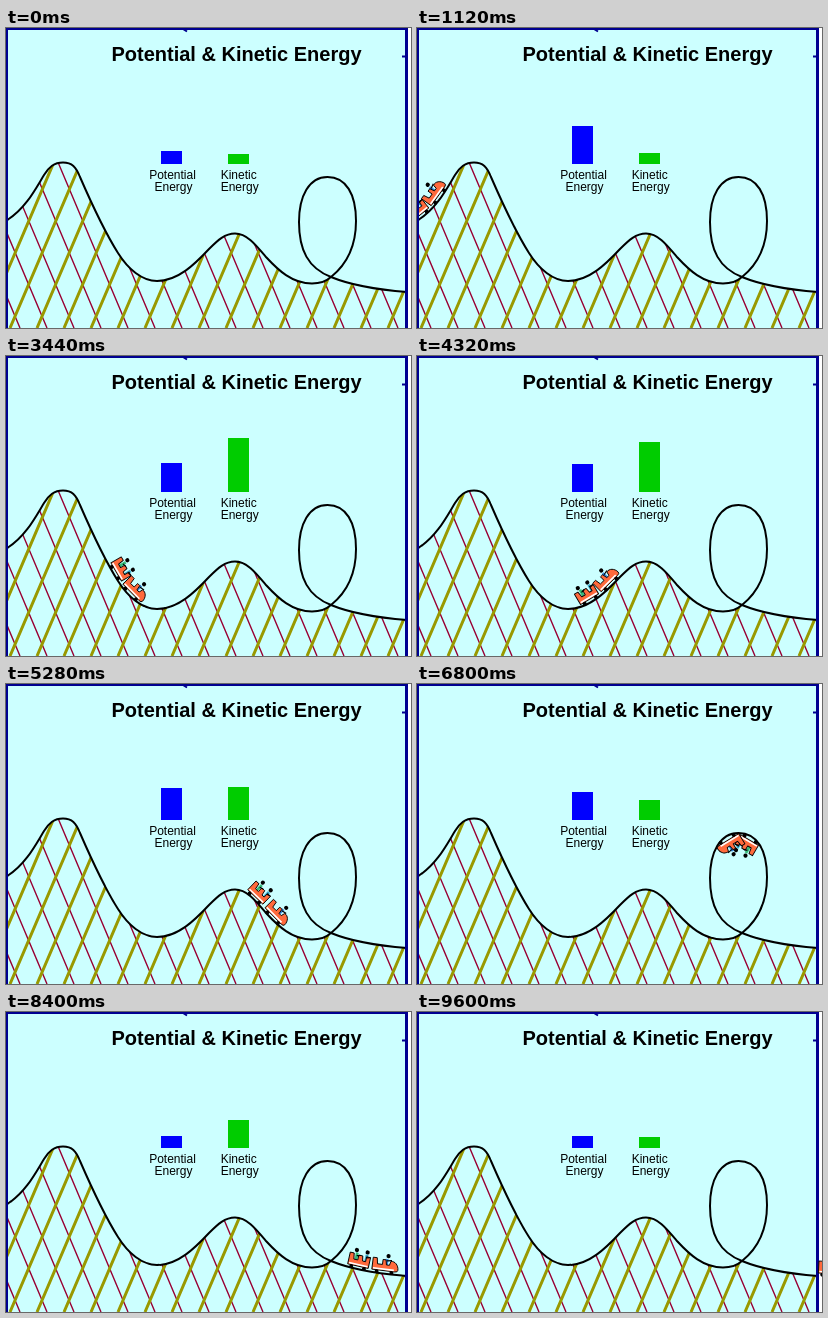
Recreate the animation shown at these times as an HTML page. Size 405 by 300 pixels, loop 9680 ms.

```html
<!DOCTYPE html>
<html lang="en">
<head>
<meta charset="utf-8">
<title>Potential &amp; Kinetic Energy</title>
<style>
  html, body { margin: 0; width: 100%; height: 100%; overflow: hidden; background: #fff; }
  svg { display: block; width: 405px; height: 300px; }
  text { font-family: "Liberation Sans", Arial, sans-serif; font-size: 12px; text-anchor: middle; }
  .title { font-size: 20px; font-weight: bold; }
  .body { fill: #ff6a3c; stroke: #000; stroke-width: .9; stroke-linejoin: round; }
  .rider { fill: none; stroke-width: 2.8; }
  .arm { fill: none; stroke: #000; stroke-width: 1.2; }
  .trim { fill: none; stroke: #fff; stroke-width: 1.6; }
</style>
</head>
<body>
<svg viewBox="0 0 405 300">
  <defs>
    <clipPath id="ground"><path id="groundShape"/></clipPath>
    <clipPath id="stage"><rect x="2" y="2" width="403" height="298"/></clipPath>
  </defs>
  <rect width="402" height="300" fill="#ccffff"/>

  <g clip-path="url(#ground)" fill="none">
    <path id="thin" stroke="#990033" stroke-width="1.4"/>
    <path id="thick" stroke="#999900" stroke-width="3"/>
  </g>
  <path id="track" fill="none" stroke="#000" stroke-width="2"/>

  <rect x="402" width="3" height="300" fill="#fff"/>
  <path d="M1 300V1H400.5" fill="none" stroke="#000090" stroke-width="2"/>
  <path d="M400.5 0V300" stroke="#000090" stroke-width="3"/>
  <path d="M177 1l4 2.5M396 28.5h4" stroke="#000090" stroke-width="2"/>

  <text class="title" x="230.5" y="33">Potential &amp; Kinetic Energy</text>
  <text x="166.5" y="150.5">Potential</text>
  <text x="167.5" y="162.5">Energy</text>
  <text x="232.7" y="150.5">Kinetic</text>
  <text x="233.7" y="162.5">Energy</text>
  <rect id="pot" x="155" width="21" fill="#0000ff"/>
  <rect id="kin" x="222" width="21" fill="#00cc00"/>

  <g clip-path="url(#stage)">
    <g id="rear">
      <path class="rider" stroke="#33bb77" d="M-4-8V-16"/>
      <path class="rider" stroke="#33aacc" d="M6-8V-16"/>
      <path class="body" d="M-11-3V-15h4l1 6h4v-5h4l1 5h3v-5h4V-3z"/>
      <path class="arm" d="M-4-13l4-1M6-13l4-1"/>
      <path class="trim" d="M-10-4.5H9"/>
      <circle cx="-5" cy="-18.5" r="2.1"/><circle cx="6" cy="-18.5" r="2.1"/>
      <circle cx="-7" cy="-1.5" r="2"/><circle cx="6" cy="-1.5" r="2"/>
    </g>
    <g id="front">
      <path class="rider" stroke="#3388dd" d="M2-8V-15"/>
      <path class="body" d="M-12-3V-15h4l1 6h5v-5h3l1 5h3l1-4C10-14 14-10 14-5q0 2-3 2z"/>
      <path class="arm" d="M2-13l5-1"/>
      <path class="trim" d="M-11-4.5H10"/>
      <circle cx="3" cy="-18" r="2.1"/>
      <circle cx="-7" cy="-1.5" r="2"/><circle cx="8" cy="-1.5" r="2"/>
    </g>
  </g>
</svg>
<script>
const $ = id => document.getElementById(id);
const LOOP = 9680, STEP = 80, BASE = 136, GAP = 26, PITCH = 27;

const hills = "M-60 250L2 191.5C20 180 30 160 38 147C43 139 48 134.5 57 134.5" +
  "C66 134.5 70 139 74 149C84 172 100 206 112 225C122 241 136 253 151 253" +
  "C172 253 189 236 203 221C212 212 219 205.5 229 205.5C241 205.5 250 217 260 229" +
  "C272 242 286 255.5 306 255.5C314 255.5 320 253.5 325 249";
const loop = "C340 237 350 219 350 193C350 166 340 149 321.5 149" +
  "C303 149 293 168 293 194C293 222 302 240 325 249";
const exit = "C348 258.5 375 262 401 264L480 268";

$("track").setAttribute("d", hills + loop + exit);
$("groundShape").setAttribute("d", hills + exit + "V300H-60z");

// Slanted supports, evenly spaced along the bottom edge
const slats = (first, dx) => Array.from({ length: 24 },
  (_, i) => `M${first + i * PITCH} 300l${dx}-180`).join("");
$("thick").setAttribute("d", slats(-50, 77));
$("thin").setAttribute("d", slats(-13, -76));

// time, middle of the train on the track (x, y), tops of the two bars
const keys = [
  [0, -20, 212.5, 123, 126],
  [2000, 37, 149, 78, 125],
  [2560, 57, 134.5, 64, 125],
  [3120, 98, 199, 91.5, 97.5],
  [3440, 115, 229, 107, 82],
  [3800, 151, 253, 125, 64],
  [4160, 173, 248, 113.5, 78],
  [4900, 229, 205.5, 90, 117],
  [5280, 257, 225, 104, 103],
  [5800, 306, 255.5, 125, 85],
  [6800, 321.5, 149, 108, 116],
  [7480, 325, 249, 124, 95],
  [8400, 364, 260, 124, 108],
  [9600, 425, 265.2, 124, 125],
  [LOOP, 429, 265.4, 124, 125]
];

const track = $("track");
const pts = Array.from({ length: Math.floor(track.getTotalLength()) },
  (_, i) => track.getPointAtLength(i));

function nearest(x, y, from) {
  let best = from, min = Infinity;
  for (let i = from; i < pts.length; i++) {
    const d = Math.hypot(pts[i].x - x, pts[i].y - y);
    if (d < min) { min = d; best = i; }
  }
  return best;
}

let last = 0;
const steps = keys.map(([t, x, y, pot, kin]) => {
  last = nearest(x, y, last);
  return [t, last, pot, kin];
});

function stateAt(t) {
  const i = Math.max(1, steps.findIndex(k => k[0] > t));
  const a = steps[i - 1], b = steps[i];
  const f = (t - a[0]) / (b[0] - a[0]);
  return a.map((v, j) => v + (b[j] - v) * f);
}

function pointAt(s) {
  s = Math.max(0, Math.min(pts.length - 1.01, s));
  const i = Math.floor(s), f = s - i, a = pts[i], b = pts[i + 1];
  return [a.x + (b.x - a.x) * f, a.y + (b.y - a.y) * f];
}

function placeCar(id, s) {
  const [x1, y1] = pointAt(s - 7), [x2, y2] = pointAt(s + 7);
  const angle = Math.atan2(y2 - y1, x2 - x1) * 180 / Math.PI;
  $(id).setAttribute("transform",
    `translate(${(x1 + x2) / 2} ${(y1 + y2) / 2}) rotate(${angle})`);
}

function setBar(id, top) {
  top = Math.round(top);
  $(id).setAttribute("y", top);
  $(id).setAttribute("height", BASE - top);
}

function draw(now) {
  const t = Math.floor((now % LOOP) / STEP) * STEP;
  const [, s, pot, kin] = stateAt(t);
  placeCar("rear", s - GAP / 2);
  placeCar("front", s + GAP / 2);
  setBar("pot", pot);
  setBar("kin", kin);
}

const start = performance.now();
function tick() {
  draw(performance.now() - start);
  requestAnimationFrame(tick);
}
tick();
</script>
</body>
</html>
```
